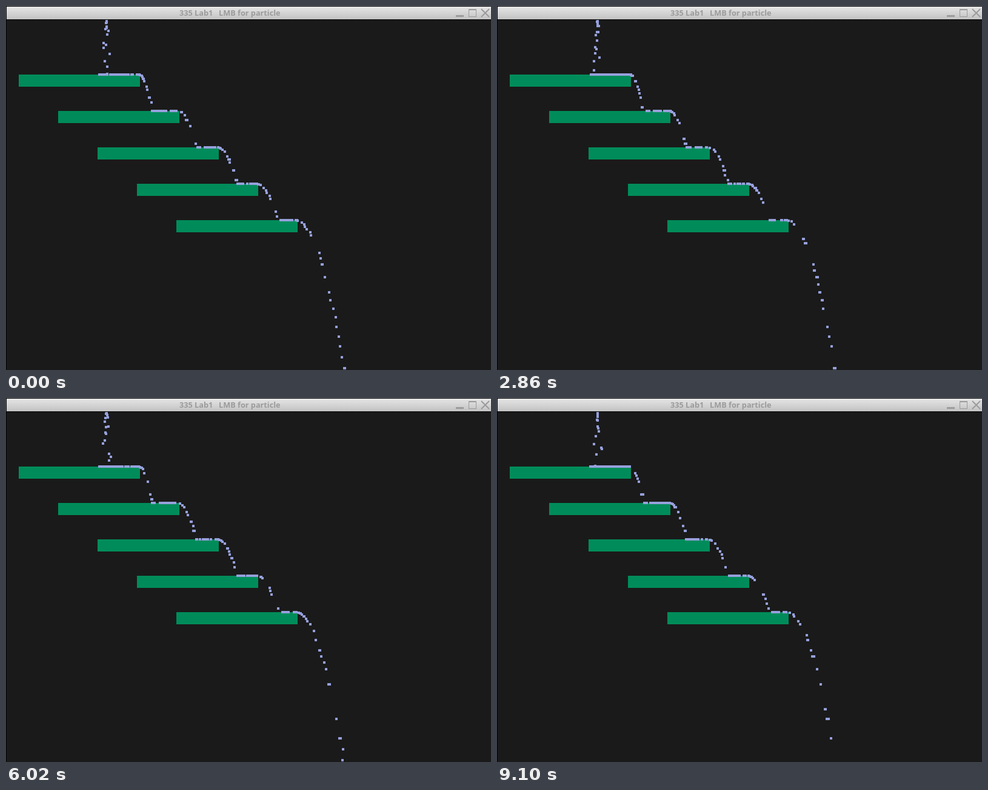
Animation, 800 px wide and 600 px high, one loop 9200 ms. Source, as an HTML page with a canvas:

```html
<!DOCTYPE html>
<html lang="en">
<head>
<meta charset="utf-8">
<title>Particles</title>
<style>
html, body { margin: 0; width: 100%; height: 100%; overflow: hidden; background: #1a1a1a; }
canvas { display: block; }
#title {
  position: absolute; left: 286px; top: 2px;
  font: bold 12.7px/19px "Noto Sans", "Open Sans", sans-serif;
  color: #9b9b9b; white-space: pre;
}
</style>
</head>
<body>
<canvas id="stage" width="800" height="600"></canvas>
<div id="title">335 Lab1   LMB for particle</div>
<script>
const ctx = document.getElementById('stage').getContext('2d');
const LOOP = 9200, FRAMES = 228, WARMUP = 300, GRAVITY = 0.694;
const ledges = [0, 1, 2, 3, 4].map(i => ({ x: 21 + 65 * i, y: 113 + 60 * i }));

let seed = 335;
function random() {
  seed = (seed * 1664525 + 1013904223) % 4294967296;
  return seed / 4294967296;
}

// Positions of one particle, one entry per step, until it leaves the window.
function makePath() {
  let x = 166, y = 25, vx = random() * 1.1 - 0.55, vy = random() - 0.5;
  const path = [];
  while (y < 602) {
    path.push([Math.round(x), Math.round(y + 0.1)]);
    vy += GRAVITY;
    x += vx;
    y += vy;
    const ledge = ledges.find(l => x >= l.x && x <= l.x + 200 && y > l.y && y < l.y + 20);
    if (ledge) {
      y = ledge.y;
      vy = 0;
      vx += 0.031 - 0.0045 * vx;
    }
  }
  return path;
}
const paths = Array.from({ length: WARMUP + FRAMES }, makePath);

function rect(color, x, y, w, h) {
  ctx.fillStyle = color;
  ctx.fillRect(x, y, w, h);
}

function drawTitleBar() {
  const shade = ctx.createLinearGradient(0, 1, 0, 22);
  shade.addColorStop(0, '#e6e6e6');
  shade.addColorStop(1, '#c2c2c2');
  rect('#000', 0, 0, 800, 23);
  rect(shade, 1, 1, 799, 21);
  rect('#000', 0, 23, 1, 577);

  const grey = '#9b9b9b';
  rect(grey, 742, 15, 13, 3);
  rect(grey, 763, 5, 13, 2);
  ctx.strokeStyle = grey;
  ctx.lineWidth = 1;
  ctx.strokeRect(763.5, 5.5, 12, 12);
  ctx.lineWidth = 2;
  ctx.beginPath();
  ctx.moveTo(784, 5); ctx.lineTo(797, 18);
  ctx.moveTo(797, 5); ctx.lineTo(784, 18);
  ctx.stroke();
}

function draw(frame) {
  rect('#1a1a1a', 0, 0, 800, 600);
  for (const l of ledges) rect('#008c5a', l.x, l.y, 200, 20);
  const newest = WARMUP + frame;
  for (let i = 0; i <= newest; i++) {
    const spot = paths[i][newest - i];
    if (spot) rect('#96a0dc', spot[0] - 2, spot[1] - 2, 4, 4);
  }
  drawTitleBar();
}

function frameAt(t) {
  if (t < 100) return t < 50 ? 0 : 1;
  return Math.min(FRAMES - 1, Math.floor((t - 20) / 40));
}

const start = performance.now();
function tick() {
  draw(frameAt((performance.now() - start) % LOOP));
  requestAnimationFrame(tick);
}
tick();
</script>
</body>
</html>
```
